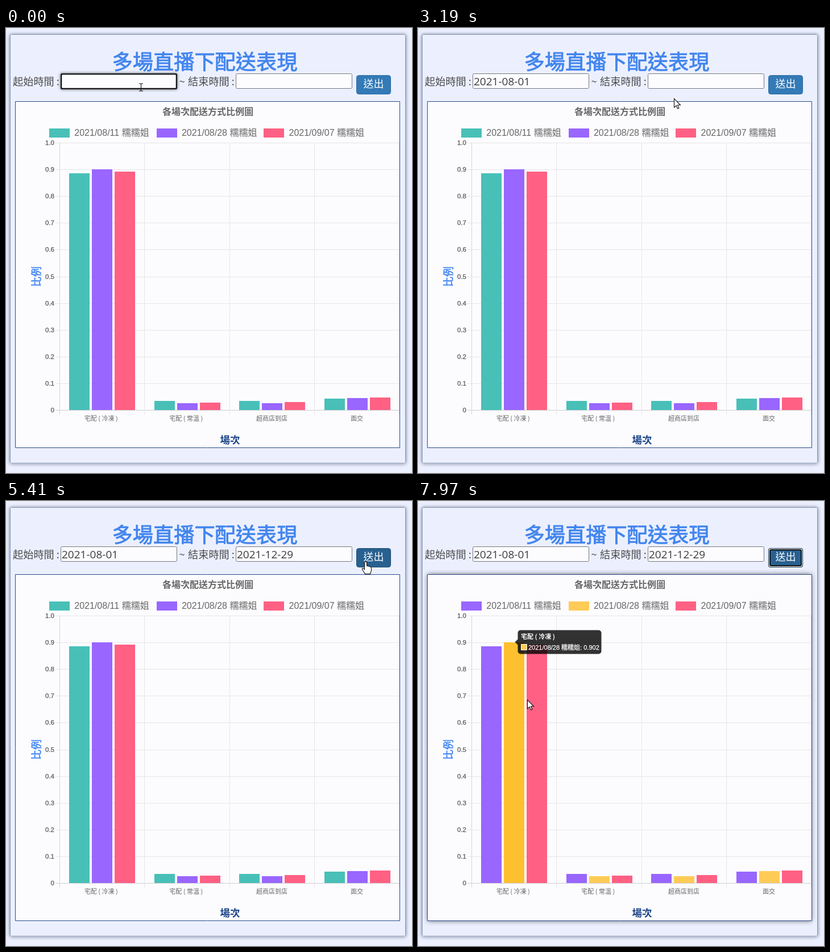
These frames come from a looping animation (714x784 px, 8000 ms). An HTML page with a canvas:

```html
<!DOCTYPE html>
<html lang="zh-Hant">
<head>
<meta charset="utf-8">
<title>多場直播下配送表現</title>
<style>
html, body { margin: 0; width: 100%; height: 100%; overflow: hidden; background: #ecf0fe; }
canvas { display: block; }
</style>
</head>
<body>
<canvas id="stage" width="714" height="784"></canvas>
<script>
const ctx = document.getElementById('stage').getContext('2d');
const LOOP = 8000, PAGE = '#ecf0fe';
const CJK = '"Noto Sans CJK TC", "Noto Sans CJK", sans-serif';
const ARIAL = '"Liberation Sans", "Noto Sans CJK TC", sans-serif';
const DATE_FONT = '400 19px "Open Sans", "Noto Sans", sans-serif';

const clamp = v => Math.min(1, Math.max(0, v));
const mix = (a, b, k) => a + (b - a) * k;
const smooth = k => k * k * (3 - 2 * k);
const outQuart = k => 1 - (1 - k) ** 4;
const ramp = (t, start, length) => clamp((t - start) / length);
const pulse = (t, start, end, length) => smooth(ramp(t, start, length)) - smooth(ramp(t, end, length));
const inside = (p, x, y, w, h) => p.x >= x && p.x <= x + w && p.y >= y && p.y <= y + h;

// An outline of the given width thickens the strokes to a medium weight.
function text(s, x, y, font, color, align = 'left', outline = 0) {
  ctx.font = font;
  ctx.fillStyle = ctx.strokeStyle = color;
  ctx.textAlign = align;
  ctx.fillText(s, x, y);
  if (outline) {
    ctx.lineWidth = outline;
    ctx.lineJoin = 'round';
    ctx.strokeText(s, x, y);
  }
}
function box(x, y, w, h, r, fill, stroke, line = 1) {
  ctx.beginPath();
  ctx.roundRect(x, y, w, h, r);
  if (fill) { ctx.fillStyle = fill; ctx.fill(); }
  if (stroke) { ctx.strokeStyle = stroke; ctx.lineWidth = line; ctx.stroke(); }
}
function faded(alpha, draw) {
  if (alpha <= 0) return;
  ctx.save();
  ctx.globalAlpha *= alpha;
  draw();
  ctx.restore();
}
function glow(x, y, w, h, color, blur, fill) {
  ctx.save();
  ctx.shadowColor = color;
  ctx.shadowBlur = blur;
  box(x, y, w, h, 2, fill);
  ctx.restore();
}

// Timeline
const PICK_START = 2350, PICK_END = 4450, SUBMIT = 5840, REDRAW = 5900;
const TIP_IN = 6973, TIP_MOVE = 7600;
const MONTH_CLICKS = [880, 1070, 1240, 1430];
const pickers = [{ x: 97, open: 130, close: PICK_START }, { x: 405, open: 3430, close: PICK_END }];
const route = [
  [0, 237, 104], [250, 237, 104], [780, 108, 119], [1640, 108, 119], [2200, 117, 196],
  [2480, 117, 196], [3150, 450, 124], [3270, 450, 124], [3400, 487, 100], [3500, 487, 100],
  [4050, 487, 293], [4150, 487, 293], [4380, 516, 320], [4600, 516, 320], [5300, 632, 106],
  [6150, 632, 106], [6800, 95, 352], [6990, 130, 347], [7510, 130, 347], [7930, 192, 350], [8000, 192, 350]
];
function pointerAt(t) {
  const i = route.findIndex(k => k[0] > t);
  const [t0, x0, y0] = route[i - 1], [t1, x1, y1] = route[i];
  const k = smooth((t - t0) / (t1 - t0));
  return { x: mix(x0, x1, k), y: mix(y0, y1, k) };
}

// Chart
const TEAL = '#48c0b8', PURPLE = '#9966ff', RED = '#ff6083', YELLOW = '#ffcb57';
const HOST = '糯糯姐';
const days = ['2021/08/11', '2021/08/28', '2021/09/07'];
const groups = [
  ['宅配 ( 冷凍 ) ', .886, .902, .893], ['宅配 ( 常溫 ) ', .034, .026, .028],
  ['超商店到店', .036, .026, .031], ['面交', .043, .045, .047]
];
const BASE = 673, UNIT = 471, LEFT = 94, STEP = 149.5;

function drawBar(group, series, color, grow) {
  const top = Math.ceil(BASE - groups[group][series + 1] * UNIT * grow);
  ctx.fillStyle = color;
  ctx.fillRect(Math.round(111 + group * STEP + series * 40), top, 36, BASE - top);
}
function drawChart(t) {
  const hover = pulse(t, 2500, 2900, 250) + pulse(t, 4650, 5050, 250) + smooth(ramp(t, 6300, 300));
  faded(hover, () => glow(17, 129, 675, 611, 'rgba(0,0,0,.55)', 8, '#fff'));
  box(16.5, 129.5, 676, 610, 0, '#fcfcff', '#284b86');
  text('各場次配送方式比例圖', 355, 153, 'bold 16px ' + CJK, '#666', 'center');

  const colors = t < REDRAW ? [TEAL, PURPLE, RED] : [PURPLE, YELLOW, RED];
  days.forEach((day, i) => {
    const x = 76 + i * 188.6;
    ctx.fillStyle = colors[i];
    ctx.fillRect(Math.round(x), 177, 36, 16);
    text(`${day} ${HOST}`, x + 44.3, 190, '16px ' + ARIAL, '#666');
  });

  for (let i = 0; i <= 10; i++) {
    const y = Math.round(BASE - i * UNIT / 10);
    ctx.fillStyle = i ? '#e6e6e8' : '#cdcdd2';
    ctx.fillRect(87, y, 605, 1);
    text(i ? (i / 10).toFixed(1) : '0', 85, y + 4, '11.5px ' + ARIAL, '#555', 'right', .25);
  }
  for (let i = 0; i < 5; i++) {
    ctx.fillStyle = i ? '#e6e6e8' : '#d6d6da';
    ctx.fillRect(Math.min(691, Math.floor(LEFT + i * STEP)), 202, 1, 479);
  }

  const grow = t < REDRAW ? 1 : outQuart(ramp(t, REDRAW, 1000));
  groups.forEach(([label, ...values], g) => {
    values.forEach((_, s) => drawBar(g, s, colors[s], grow));
    text(label, 168.5 + g * STEP, 692, '11px ' + CJK, '#666', 'center');
  });
  text('場次', 394, 732, 'bold 17.5px ' + CJK, '#1c4587', 'center');
  ctx.save();
  ctx.translate(60, 438);
  ctx.rotate(-Math.PI / 2);
  text('比例', 0, 0, '18px ' + CJK, '#4285f4', 'center', .5);
  ctx.restore();
  drawTooltip(t, colors);
}
function drawTooltip(t, colors) {
  const shown = outQuart(ramp(t, TIP_IN, 400));
  const moved = outQuart(ramp(t, TIP_MOVE, 350));
  const active = t < TIP_MOVE ? 0 : 1;
  faded(shown * (1 - moved), () => drawBar(0, 0, '#8040ff', 1));
  faded(moved, () => drawBar(0, 1, '#ffc02f', 1));
  faded(shown, () => {
    const x = mix(136, 175.5, moved), y = mix(235, 227.5, moved);
    ctx.fillStyle = 'rgba(0,0,0,.8)';
    ctx.beginPath();
    ctx.roundRect(x, y, 147, 42, 5);
    ctx.moveTo(x, y + 16);
    ctx.lineTo(x - 5, y + 21);
    ctx.lineTo(x, y + 26);
    ctx.fill();
    text(groups[0][0], x + 5.5, y + 15.5, 'bold 11px ' + CJK, '#fff');
    box(x + 6, y + 25, 10, 10, 0, colors[active], '#fff');
    text(`${days[active]} ${HOST}: ${groups[0][active + 1]}`, x + 18.5, y + 34, '11px ' + ARIAL, '#fff', 'left', .25);
  });
}

// Form
function drawInput(x, value, hovered, focused, t) {
  if (hovered) {
    glow(x - 1, 80, 205, 28, 'rgba(0,0,0,.7)', 5, '#222');
    box(x + .5, 81.5, 202, 25, 2, '#fcfcff', '#111', 1.5);
  } else {
    box(x - .5, 80.5, 204, 26, 2, '#fcfcff', focused ? '#333' : '#767680');
  }
  text(value, x + 1, 101, DATE_FONT, '#3c3c3c');
  if (focused && t % 1000 > 100) {
    ctx.fillStyle = '#222';
    ctx.fillRect(x + 2, 84, 1, 20);
  }
}
function drawButton(hovered, pressed) {
  if (pressed) {
    box(616, 83, 61, 34, 4, '#122b40');
    box(617, 84, 59, 32, 3, '#fff');
    box(618, 85, 57, 30, 3, '#101010');
    box(620, 87, 53, 26, 1, '#286090');
  } else {
    box(616.5, 83.5, 60, 33, 4, hovered ? '#286090' : '#337ab7', hovered ? '#204d74' : '#2e6da4');
  }
  text('送出', 646.5, 105, '18px ' + CJK, '#fff', 'center');
}

// Date picker
const monthNames = ['August', 'September', 'October', 'November', 'December'];
const columns = [[4, 28], [34, 29], [66, 27], [95, 31], [128, 27], [156, 28], [185, 28]];

function drawArrow(x, direction) {
  ctx.fillStyle = '#3d3d42';
  ctx.beginPath();
  ctx.arc(x, 124.5, 6, 0, 7);
  ctx.fill();
  ctx.strokeStyle = '#fff';
  ctx.lineWidth = 1.8;
  ctx.beginPath();
  ctx.moveTo(x - direction * 1.5, 121.5);
  ctx.lineTo(x + direction * 1.5, 124.5);
  ctx.lineTo(x - direction * 1.5, 127.5);
  ctx.stroke();
}
function drawPicker({ x, open }, t, pointer) {
  const back = open < 1000 ? MONTH_CLICKS.filter(c => c <= t).length : 0;
  const month = 11 - back;
  const first = new Date(2021, month, 1).getDay();
  const count = new Date(2021, month + 1, 0).getDate();
  const rows = Math.ceil((first + count) / 7);
  box(x + .5, 107.5, 216, 78 + rows * 31.2, 3, '#fdfdff', '#c5c5c9');
  box(x + 3.5, 110.5, 210, 30, 3, '#e9e9ef', '#dedee4');
  if (inside(pointer, x + 5, 112, 22, 24)) box(x + 6.5, 114.5, 20, 20, 3, '#f0f0f2', '#ccc');
  drawArrow(x + 17, -1);
  drawArrow(x + 199, 1);
  text(`${monthNames[month - 7]} 2021`, x + 108.5, 129.5, 'bold 12.5px ' + ARIAL, '#333', 'center');
  ['Su', 'Mo', 'Tu', 'We', 'Th', 'Fr', 'Sa'].forEach((name, i) =>
    text(name, x + [18, 49, 79, 110, 141, 170, 199][i], 163, 'bold 12px ' + ARIAL, '#333', 'center'));

  let hand = false;
  for (let day = 1; day <= count; day++) {
    const slot = first + day - 1;
    const [left, width] = columns[slot % 7];
    const cx = x + left, cy = Math.round(180 + Math.floor(slot / 7) * 31.2);
    const hovered = inside(pointer, cx, cy, width, 29);
    const today = month === 11 && day === 12;
    hand ||= hovered;
    box(cx + .5, cy + .5, width - 1, 28, 0,
      today ? '#fffa90' : hovered ? '#e9e9ed' : '#f6f6f8', today ? '#dad55e' : '#c7c7cb');
    text(day, cx + width - 2.5, cy + 18, '12.5px ' + ARIAL,
      today ? '#8a8040' : hovered ? '#111' : '#404040', 'right');
  }
  return hand;
}

// Pointer
const shapes = {
  arrow: new Path2D('M0 0V15.5L3.6 12.2L6 17.6L8.4 16.6L6 11.3H11Z'),
  hand: new Path2D('M-2 1.5Q0-1 2 1.5V7.5L8 9.2Q10 10 10 12.5V16L8 22H-1L-5.8 14.5Q-6.8 11.5-4.4 12L-2 14Z'),
  beam: new Path2D('M-3.5-6.5H-1L0-5.5L1-6.5H3.5M0-5.5V5.5M-3.5 6.5H-1L0 5.5L1 6.5H3.5')
};
function drawPointer({ x, y }, kind) {
  ctx.save();
  ctx.translate(x + .5, y + .5);
  ctx.lineWidth = 1.1;
  ctx.strokeStyle = '#111';
  ctx.fillStyle = '#fff';
  if (kind !== 'beam') ctx.fill(shapes[kind]);
  ctx.stroke(shapes[kind]);
  ctx.restore();
}

function draw(t) {
  const pointer = pointerAt(t);
  const lowered = pulse(t, 420, 2480, 300) + pulse(t, 3600, 4500, 300);
  const dy = 14 * lowered;
  const local = { x: pointer.x, y: pointer.y - dy };
  const opacity = p => ramp(t, p.open, 200) - ramp(t, p.close, 200);
  const covered = pickers.some(p => opacity(p) > 0 && inside(pointer, p.x, 107, 217, 234));
  const over = (x, y, w, h) => !covered && inside(local, x, y, w, h);
  const overStart = over(97, 81, 203, 26), overEnd = over(405, 81, 203, 26);
  const overButton = over(616, 83, 60, 34);

  ctx.fillStyle = PAGE;
  ctx.fillRect(0, 0, 714, 784);
  ctx.save();
  ctx.translate(0, dy);
  faded(1 - lowered, () => {
    glow(7, 11.5, 696, 756, 'rgba(30,45,80,.65)', 6, PAGE);
    box(7.5, 11.5, 695, 755, 2, PAGE, '#8c99b4');
  });
  text('多場直播下配送表現', 349.5, 72.5, '36.2px ' + CJK, '#4285ee', 'center', .9);
  const labelFont = '18.2px ' + CJK;
  text('起始時間 :', 12, 101, labelFont, '#4c4c50');
  text('~', 304.5, 101, labelFont, '#4c4c50');
  text('結束時間 :', 320, 101, labelFont, '#4c4c50');
  drawInput(97, t < PICK_START ? '' : '2021-08-01', overStart, t < PICK_START, t);
  drawInput(405, t < PICK_END ? '' : '2021-12-29', overEnd, t >= 3430 && t < PICK_END, t);
  drawButton(overButton, t >= SUBMIT);
  drawChart(t);
  ctx.restore();

  let overDay = false;
  for (const p of pickers) faded(opacity(p), () => { overDay = drawPicker(p, t, pointer); });
  drawPointer(pointer, overDay || overButton ? 'hand' : overStart || overEnd ? 'beam' : 'arrow');
}

const began = performance.now();
function tick() {
  draw((performance.now() - began) % LOOP);
  requestAnimationFrame(tick);
}
tick();
</script>
</body>
</html>
```
